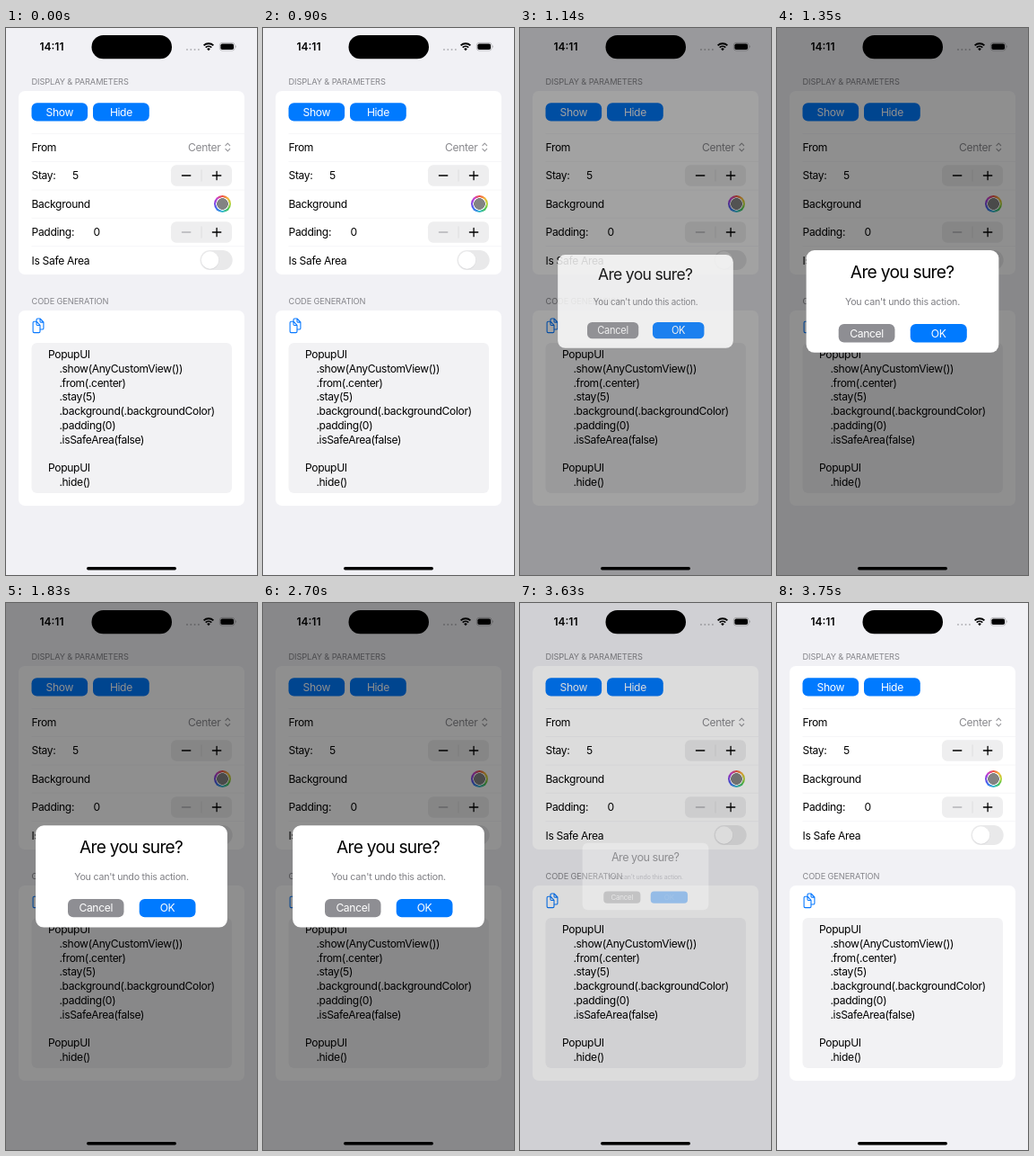
These frames come from a looping animation (280x608 px, 4200 ms). An HTML page:

```html
<!DOCTYPE html>
<html lang="en">
<head>
<meta charset="utf-8">
<title>Popup demo</title>
<style>
  html, body { margin: 0; width: 100%; height: 100%; overflow: hidden; background: #f1f1f5; }
  #stage { position: absolute; left: 0; top: 0; width: 280px; height: 608px; overflow: hidden; background: #f1f1f5; }
  svg, #dim { position: absolute; left: 0; top: 0; width: 280px; height: 608px; }
  #dim { background: #000; opacity: 0; }
  text { font: 12.1px Inter, Roboto, sans-serif; letter-spacing: -.028em; white-space: pre; }
  .mid { text-anchor: middle; }
  .head { font-size: 9.26px; letter-spacing: -.013em; fill: #85858a; }
  .clock { font-size: 12px; font-weight: 600; letter-spacing: 0; }
  .title { font-size: 19.2px; letter-spacing: -.039em; }
  .note { font-size: 10.69px; letter-spacing: -.022em; fill: #7f7f84; }
  .white { fill: #fff; }
  .blue { fill: #007aff; }
  .well { fill: #eeeeef; }
  .line { fill: none; stroke-linecap: round; stroke-linejoin: round; }
  #ring {
    position: absolute; left: 231.8px; top: 185.8px; width: 19.4px; height: 19.4px; border-radius: 50%;
    background: radial-gradient(circle, #838383 6.1px, #fff 6.5px 7px, transparent 7.4px),
      conic-gradient(#f0503c, #f2b83a, #b5d53c, #46c25a, #36bcd0, #3a72ee, #7a48e6, #c840d0, #f0503c);
  }
  #popup { transform-origin: 140px 304px; opacity: 0; }
</style>
</head>
<body>
<div id="stage">
  <svg viewBox="0 0 280 608">
    <defs>
      <g id="stepper">
        <rect class="well" x="184" y="-11.7" width="68" height="23.4" rx="6"/>
        <path d="M218-6.5v13" stroke="#d8d8db" stroke-width=".8"/>
        <path class="line" d="M230.4 0h9.4M235.1-4.7v9.4" stroke="#000" stroke-width="1.3"/>
      </g>
    </defs>

    <text class="clock mid" x="51" y="25">14:11</text>
    <rect x="95.5" y="8" width="89.5" height="26.3" rx="13.1"/>
    <path class="line" d="M202 24h.01M206.3 24h.01M210.6 24h.01M214.9 24h.01" stroke="#b2b2b6" stroke-width="1.9"/>
    <g class="line" stroke="#000" stroke-width="1.8" style="stroke-linecap:butt">
      <path d="M220.6 19.4a7.8 7.8 0 0 1 10.8 0M222.7 21.7a4.7 4.7 0 0 1 6.6 0"/>
    </g>
    <path d="M226 25.2l-1.8-2a2.6 2.6 0 0 1 3.6 0z"/>
    <rect x="238.4" y="16.4" width="16.6" height="8.6" rx="2.6" fill="none" stroke="#a5a5a8" stroke-width=".7"/>
    <rect x="239.4" y="17.4" width="14.6" height="6.6" rx="1.8"/>
    <path d="M255.9 19.3a1.6 1.6 0 0 1 0 2.8z" fill="#a5a5a8"/>

    <text class="head" x="28.5" y="62.8">DISPLAY &amp; PARAMETERS</text>
    <rect class="white" x="14" y="70" width="252" height="204" rx="7"/>
    <path d="M28.5 117.5H266M28.5 148.5H266M28.5 180H266M28.5 211.3H266M28.5 242.6H266" stroke="#f4f4f6" stroke-width=".8"/>
    <rect class="blue" x="28.5" y="83.3" width="62.6" height="20.2" rx="6"/>
    <rect class="blue" x="97" y="83.3" width="62.8" height="20.2" rx="6"/>
    <text class="white mid" x="59.8" y="97.7">Show</text>
    <text class="white mid" x="128.4" y="97.7">Hide</text>

    <text x="28.5" y="136.9">From</text>
    <text x="203" y="136.9" fill="#8a8a8e">Center</text>
    <path class="line" d="M244.9 130.7l2.4-2.6 2.4 2.6M244.9 134.3l2.4 2.6 2.4-2.6" stroke="#98989c" stroke-width="1.1"/>
    <text x="28.5" y="168.3">Stay:</text>
    <text x="74" y="168.3">5</text>
    <use href="#stepper" y="164"/>
    <path class="line" d="M196.4 164h9.4" stroke="#000" stroke-width="1.3"/>
    <text x="28.5" y="199.8">Background</text>
    <text x="28.5" y="231.2">Padding:</text>
    <text x="97.5" y="231.2">0</text>
    <use href="#stepper" y="227"/>
    <path class="line" d="M196.4 227h9.4" stroke="#b4b4b8" stroke-width="1.3"/>
    <text x="28.5" y="262.7">Is Safe Area</text>
    <rect x="216.5" y="247" width="36.2" height="22" rx="11" fill="#e9e9ea"/>
    <circle cx="227.8" cy="258.6" r="9.9" fill="#d9d9db"/>
    <circle class="white" cx="227.6" cy="258" r="9.7"/>

    <text class="head" x="28.5" y="306.9">CODE GENERATION</text>
    <rect class="white" x="14" y="314" width="252" height="217" rx="7"/>
    <g class="line" stroke="#0a7aff" stroke-width="1.1">
      <path d="M34 325.8v-1.5q0-1.3 1.3-1.3h2.7l3.9 4v6.7q0 1.3-1.3 1.3h-2.3M38 323.2v3q0 .9.9.9h2.9"/>
      <path d="M31.4 326.2h2.6l4 4.1v7q0 1.3-1.3 1.3h-5.3q-1.3 0-1.3-1.3v-9.8q0-1.3 1.3-1.3zM34 326.4v3.2q0 .9.9.9h3"/>
    </g>
    <rect x="28.5" y="350" width="223.5" height="167" rx="6" fill="#f2f2f4"/>
    <g id="code"></g>
    <rect x="90" y="599" width="100" height="3.4" rx="1.7"/>
  </svg>
  <div id="ring"></div>
  <div id="dim"></div>
  <svg viewBox="0 0 280 608">
    <g id="popup">
      <rect class="white" x="33.1" y="247.3" width="213.8" height="113.3" rx="9"/>
      <text class="title mid" x="139.6" y="278">Are you sure?</text>
      <text class="note mid" x="140" y="308.2">You can't undo this action.</text>
      <rect x="69" y="329" width="62.5" height="20.2" rx="6" fill="#8e8e93"/>
      <text class="white mid" x="100.2" y="343.4">Cancel</text>
      <rect class="blue" x="148.7" y="329" width="62.8" height="20.2" rx="6"/>
      <text class="white mid" id="ok" x="180" y="343.4">OK</text>
    </g>
  </svg>
</div>
<script>
  const LOOP = 4200, STEP = 30, SHOW = 907, PRESS = 3540, HIDE = 3519, HIDE_TIME = 182, DIM = 0.44;
  const $ = id => document.getElementById(id);

  const code = ['PopupUI', '.show(AnyCustomView())', '.from(.center)', '.stay(5)',
    '.background(.backgroundColor)', '.padding(0)', '.isSafeArea(false)', '', 'PopupUI', '.hide()'];
  $('code').innerHTML = code.map((s, i) =>
    `<text x="${s[0] === '.' ? 59.4 : 47}" y="${367.2 + 15.73 * i}">${s}</text>`).join('');

  // Damped spring from 0 to 1, s in seconds
  function spring(s, response = 0.55, damping = 0.825) {
    const w = 2 * Math.PI / response, decay = w * damping;
    const wd = w * Math.sqrt(1 - damping * damping);
    return 1 - Math.exp(-decay * s) * (Math.cos(wd * s) + decay / wd * Math.sin(wd * s));
  }

  // Cubic ease in-out with control points .42,0 and .58,1
  function easeInOut(x) {
    let lo = 0, hi = 1;
    for (let i = 0; i < 20; i++) {
      const u = (lo + hi) / 2, v = 1 - u;
      if (1.26 * v * v * u + 1.74 * v * u * u + u * u * u < x) lo = u; else hi = u;
    }
    return lo * lo * (3 - 2 * lo);
  }

  function presence(t) {
    if (t < SHOW) return 0;
    if (t < PRESS) return spring((t - SHOW) / 1000);
    const x = (t - HIDE) / HIDE_TIME;
    return x < 1 ? 1 - easeInOut(x) : 0;
  }

  function draw() {
    const t = Math.floor(performance.now() % LOOP / STEP) * STEP;
    const p = presence(t), alpha = Math.min(1, p);
    $('dim').style.opacity = DIM * alpha;
    $('popup').style.opacity = alpha;
    $('popup').style.transform = `scale(${0.5 + 0.5 * p})`;
    $('ok').style.opacity = t >= PRESS ? 0.15 : 1;
    requestAnimationFrame(draw);
  }
  draw();
</script>
</body>
</html>
```
